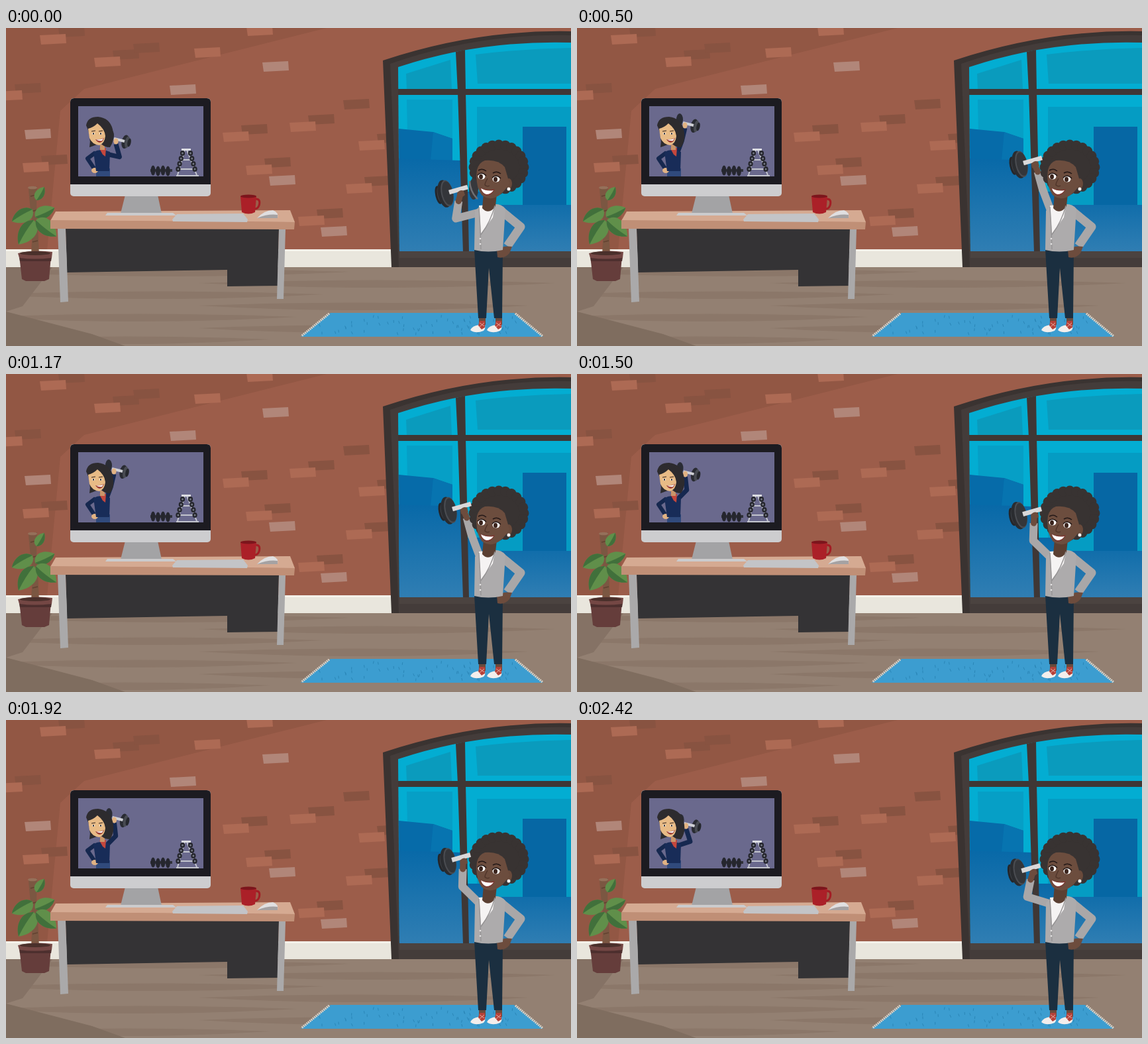
Write an HTML page that moves like this. It is 853 px wide and 480 px high and loops after 2.51 s.

```html
<!DOCTYPE html>
<html lang="en">
<head>
<meta charset="utf-8">
<title>Workout at home</title>
<style>
  html, body { margin: 0; width: 100%; height: 100%; overflow: hidden; background: #9b5c49; }
  svg { display: block; width: 100vw; height: 100vh; }
</style>
</head>
<body>
<svg id="stage" viewBox="0 0 853 480" preserveAspectRatio="none"></svg>
<script>
const poly = (points, fill) => `<polygon points="${points}" fill="${fill}"/>`;
const path = (d, fill) => `<path d="${d}" fill="${fill}"/>`;
const line = (d, color, width, extra = '') =>
  `<path d="${d}" fill="none" stroke="${color}" stroke-width="${width}" stroke-linejoin="round" ${extra}/>`;
const oval = (x, y, rx, ry, fill, extra = '') =>
  `<ellipse cx="${x}" cy="${y}" rx="${rx}" ry="${ry}" fill="${fill}" ${extra}/>`;
const rect = (x, y, w, h, fill, extra = '') =>
  `<rect x="${x}" y="${y}" width="${w}" height="${h}" fill="${fill}" ${extra}/>`;
const group = (transform, content, extra = '') => `<g transform="${transform}" ${extra}>${content}</g>`;
const fade = (id, top, bottom) => `<linearGradient id="${id}" x2="0" y2="1">
  <stop stop-color="${top}"/><stop offset="1" stop-color="${bottom}"/></linearGradient>`;
const repeat = (n, make) => Array.from({ length: n }, (_, i) => make(i)).join('');

let seed = 7;
const random = () => (seed = seed * 16807 % 2147483647) / 2147483647;

// Bricks: a light one usually has a darker neighbour up and to its right.
const brick = (x, y, fill) =>
  path(`M${x - 20} ${y - 6}L${x + 19} ${y - 8}L${x + 20} ${y + 6}L${x - 18} ${y + 8}Z`, fill);
const pair = (x, y) => brick(x + 28, y - 11, '#885341') + brick(x, y, '#ad6a54');
const pale = (x, y) => brick(x, y, '#b18679');

function wall() {
  return rect(0, 0, 853, 480, '#9c5d4a')
    + poly('0,0 484,0 118,92 82,125 62,336 0,336', '#925744')
    + pair(71, 17) + pair(153, 51) + pair(383, 4) + pair(5, 102) + pair(45, 210)
    + pair(347, 164) + pair(448, 149) + pair(382, 214) + pair(533, 242) + pair(552, 177) + pair(461, 291)
    + brick(304, 37, '#ad6a54') + brick(212, 30, '#885341') + brick(529, 115, '#885341')
    + pale(407, 58) + pale(267, 93) + pale(48, 160) + pale(417, 230) + pale(495, 307)
    + rect(0, 334, 582, 27, '#e9e6dd') + rect(0, 334, 582, 3, '#f4f1e9');
}

function floor() {
  const streak = i => {
    const x = (i % 2) * 330 - 40, y = 368 + i * 17, w = 560 - i * 20;
    return path(`M${x} ${y}Q${x + w / 2} ${y - 9} ${x + w} ${y}Q${x + w / 2} ${y + 14} ${x} ${y}Z`, '#8b7769');
  };
  return rect(0, 361, 853, 119, '#938072') + repeat(7, streak)
    + poly('0,361 70,361 25,420 0,428', '#857265')
    + poly('0,428 130,462 180,480 0,480', '#7f6d5f');
}

function windowView() {
  return path('M569 49Q710 2 853 5V361H582Z', '#3a3331')
    + path('M580 54Q712 8 853 11V361H593Z', '#443c3a')
    + path('M592 59Q715 18 853 22V338H594Z', '#03add2')
    + poly('604,69 671,48 673,92 605,92', '#0a9bbd')
    + path('M709 40Q780 31 853 30V84H712Z', '#0a9bbd')
    + poly('605,108 674,108 674,170 606,160', '#069fc6')
    + rect(711, 119, 142, 148, '#059cc3')
    + poly('593,152 645,157 674,167 674,338 594,338', '#066ba9')
    + poly('645,157 674,167 674,200 641,199', '#0774b0')
    + rect(780, 149, 66, 189, '#0667a4')
    + poly('593,197 687,200 692,338 594,338', 'url(#near)')
    + poly('694,247 722,247 722,267 853,267 853,338 697,338', 'url(#near)')
    + poly('679,36 693,33 694,96 699,338 690,338 682,96', '#3f3735')
    + rect(592, 92, 261, 9, '#3f3735')
    + rect(594, 337, 259, 10, '#4b4340');
}

function rug() {
  const tuft = () => {
    const y = 433 + random() * 28, x = 490 + (430 - y) * 1.1 + random() * (270 + (y - 430) * 2.2);
    return line(`M${x} ${y}l${random() * 3 - 1} 4`, '#2a86b7', 1);
  };
  return poly('490,430 767,430 811,466 445,466', '#3c9dd0') + repeat(60, tuft)
    + line('M488 431L446 465M769 431L810 465', '#d9d2c8', 3.5, 'stroke-dasharray="2 1"');
}

function plant() {
  const leaf = (x, y, angle, size) => group(`translate(${x} ${y}) rotate(${angle}) scale(${size})`,
    path('M0 0C3 -16 24 -15 36 0C25 12 7 13 0 0Z', '#608f4a')
    + path('M0 0C7 13 25 12 36 0Q18 2 0 0Z', '#41703b'));
  return path('M34 241L47 239Q45 275 48 300L50 343H38L40 300Q36 270 34 241Z', '#7b5742')
    + repeat(4, i => line(`M${37 + i} ${254 + i * 23}l8 -2`, '#624231', 1.5))
    + oval(40, 241, 7, 2.3, '#95705a')
    + leaf(46, 260, -60, .65) + leaf(40, 274, 150, 1) + leaf(44, 285, -25, .9)
    + leaf(42, 290, 122, 1.2) + leaf(45, 290, 38, 1.1)
    + poly('20,344 68,344 65,379 58,382 30,382 24,379', '#653d3b')
    + poly('20,346 69,346 68,352 21,352', '#4d2f2e')
    + path('M18 340Q43 334 70 338L69 347Q43 350 20 347Z', '#744744')
    + oval(44, 340, 23, 3, '#4a302b');
}

function desk() {
  return poly('90,303 412,303 410,389 334,390 334,365 92,369', '#343335')
    + poly('78,303 90,303 94,413 82,414', '#aaa9aa')
    + poly('412,303 422,303 419,409 409,409', '#aaa9aa')
    + poly('75,277 429,275 436,293 67,291', '#d5aa92')
    + poly('67,290 436,293 435,304 67,303', '#c08f76')
    + poly('180,252 229,252 235,280 173,280', '#a3a3a5')
    + poly('153,279 252,279 257,283 150,283', '#cbcbcd')
    + poly('258,281 358,280 365,289 364,293 252,292 251,289', '#c3c4c7');
}

function deskItems() {
  return line('M377 258Q385 258 382 268Q380 273 376 273', '#a31d24', 3)
    + path('M354 254H378L376 278Q366 283 356 278Z', '#ab2028')
    + oval(366, 254, 12, 2.6, '#7c151c')
    + path('M379 287Q390 275 403 275Q412 278 410 287Z', '#e0dfe0')
    + path('M379 287Q396 280 410 282V287Z', '#a5a2a3');
}

function rack() {
  const weights = i => [-1, 1].map(side => {
    const x = 272.5 + side * (6 + i * 2.2), y = 189 + i * 8;
    return oval(x, y, 3.6, 4, '#25262d') + oval(x, y, 1.4, 1.6, '#777b87');
  }).join('');
  return line('M270 184L259 222M273 184L288 222M262 213H285M266 199H280M257 223H291', '#c3c5ce', 2)
    + rect(265, 182, 14, 3, '#dcdde3') + repeat(4, weights)
    + rect(218, 213, 33, 4, '#30323a')
    + repeat(4, i => oval(222 + i * 7.5, 215 + i % 2, 3.4, 7.5, '#25262e'));
}

function coach() {
  return oval(-9, -9, 5, 9, '#2a2c34', 'id="coachDisc"')
    + line('', '#16284f', 7, 'id="coachArm"')
    + group('', group('rotate(12)', oval(13, -2, 5.5, 10.5, '#292b32')
      + oval(16, -2, 3.6, 9, '#484b52') + oval(19, -2, 2.6, 6.5, '#25272d'))
      + line('M-4 -4L12 0', '#cfd0d5', 4) + oval(-1, 0, 3.6, 4.6, '#e2b383'), 'id="coachBell"')
    + rect(136, 212, 21, 14, '#304a7c')
    + line('M135 188L123 197L133 212', '#16284f', 6)
    + oval(134, 215, 5, 4, '#e2b383')
    + path('M132 187Q144 181 157 187L156 216H136Z', '#182c58')
    + poly('141,182 151,181 150,194 146,191', '#c4473d')
    + rect(142, 176, 7, 8, '#c9966a')
    + coachHead();
}

function coachHead() {
  const eye = x => line(`M${x - 3} 156l6 -1`, '#33231f', 1) + oval(x, 159.5, 2, 1.4, '#fff') + oval(x, 159.5, 1, 1.4, '#201a1b');
  return path('M121 147Q123 134 139 134Q157 136 161 153Q165 169 157 180Q148 180 143 174L126 180Q129 163 121 147Z', '#2d2b2e')
    + path('M124 152Q132 150 138 144Q149 152 150 163Q149 174 141 177Q130 176 126 166Z', '#e8bb86')
    + eye(132) + eye(143)
    + path('M135 168Q141 169 148 166Q146 173 141 173Q137 172 135 168Z', '#9c3d35')
    + path('M136 168.5Q141 169 147 167L145 170Q140 171 136 168.5Z', '#fff');
}

function monitor() {
  return rect(97, 106, 212, 148, '#cdcdcf', 'rx="5"')
    + path('M97 236V112Q97 106 103 106H303Q309 106 309 112V236Z', '#1c1b21')
    + rect(109, 118, 189, 106, '#6a698d')
    + `<g clip-path="url(#screen)">${rack()}${coach()}</g>`;
}

function hair() {
  const curl = i => {
    const a = i * Math.PI / 12;
    return oval(744 + 38 * Math.cos(a), 210 + 34 * Math.sin(a), 7.5, 7.5, '#383332');
  };
  return oval(744, 210, 41, 37, '#383332') + repeat(24, curl);
}

function legs() {
  const leg = x => rect(x, 434, 10, 14, '#6a4a3b') + group(`translate(${x - 1} 453)`,
    path('M-12 3Q-9 -4 2 -5L9 -6Q12 0 8 4Q-4 9 -12 3Z', '#f3eeec')
    + path('M0 -4L2 -11H10V-1L5 2Z', '#b54138')
    + line('M2 -8l7 5m0 -5l-7 6', '#e5a89f', 1));
  return leg(714) + leg(739)
    + poly('707,334 750,334 749,438 737,438 729,362 725,438 713,438', '#1b2f40');
}

function body() {
  return line('M745 274L777 300L757 329', '#a9a7a8', 13)
    + path('M741 334Q751 328 764 330L760 340Q752 349 742 346Z', '#6d4c3d')
    + path('M708 276Q718 265 730 267Q746 263 754 273L750 335Q728 340 707 335Z', '#adabac')
    + path('M714 268L738 266L735 286L717 310Z', '#f5f3f3')
    + path('M721 250H741L739 269Q729 283 719 272Z', '#5a3f32')
    + line('M714 270Q716 295 717 334M738 268Q732 292 717 312', '#949293', 1.3)
    + repeat(2, i => oval(716, 318 + i * 8, 1.3, 1.3, '#e6e4e4'));
}

function face() {
  const eye = (x, y) => oval(x, y, 5.5, 4.5, '#fff') + oval(x - 1, y + .5, 3, 3.8, '#3b241d')
    + line(`M${x - 6} ${y - 2}Q${x} ${y - 8} ${x + 7} ${y - 1}m-12 -8q6 -4 12 1`, '#231817', 1.6);
  return oval(759, 235, 5, 8, '#694a3b')
    + path('M711 214Q714 203 723 200Q743 198 753 210L760 234Q751 251 738 256Q727 260 718 252Q708 238 711 214Z', '#6c4d3e')
    + eye(718, 224) + eye(740, 228)
    + line('M727 227Q723 234 723 237Q726 240 730 238', '#4e3429', 1.3)
    + path('M716 241Q726 246 738 243Q734 253 725 253Q718 250 716 241Z', '#7d3932')
    + path('M717 242Q726 247 736 245Q732 251 725 251Q719 249 717 242Z', '#fff')
    + oval(759, 243, 2.5, 2.6, '#f7f3f2');
}

function bell() {
  const discs = oval(-33, 6, 5, 14, '#24262a') + oval(-31, 6, 4, 12, '#414449')
    + oval(-24, 6, 10, 21, '#2a2c30') + oval(-20, 6, 9, 20, '#4a4c51') + oval(-19, 6, 8, 18, '#34363a');
  return group('rotate(-12 -23 6)', discs)
    + line('M-17 4L11 -4', '#d9d8d9', 7)
    + path('M-5 5Q0 -1 5 2L7 8Q2 13 -4 11Z', '#6d4c3d');
}

function athlete() {
  return legs()
    + line('', '#a9a7a8', 12, 'id="arm"')
    + line('', '#6d4c3d', 9, 'id="wrist" stroke-linecap="round"')
    + body() + hair()
    + group('', oval(20, -1, 7, 16, '#37383c') + line('M14 -13Q15 4 26 14', '#6f7074', 2.5), 'id="farDisc"')
    + face()
    + group('', bell(), 'id="bell"');
}

const stage = document.getElementById('stage');
stage.innerHTML = `<defs>${fade('near', '#0869a8', '#307eb3')}
  <clipPath id="screen">${rect(109, 118, 189, 106, '#000')}</clipPath></defs>`
  + wall() + floor() + windowView() + plant() + desk() + deskItems() + monitor() + rug() + athlete();

const LOOP = 2510, FRAMES = 30, STEP = 250 / 3, CYCLE = 10.5;
const set = (id, name, value) => document.getElementById(id).setAttribute(name, value);
const mix = (a, b, k) => a + (b - a) * k;

function ease(from, to, t) {
  const k = Math.min(1, Math.max(0, (t - from) / (to - from)));
  return k * k * (3 - 2 * k);
}

// Push up quickly, hold, lower again.
const lift = phase => ease(.3, 2.6, phase) - ease(7, 8.9, phase);

// Elbow of a two-part arm; side picks the way it bends.
function elbow(sx, sy, hx, hy, upper, lower, side) {
  const dx = hx - sx, dy = hy - sy, d = Math.hypot(dx, dy);
  const along = (upper * upper - lower * lower + d * d) / (2 * d);
  const out = side * Math.sqrt(Math.max(0, upper * upper - along * along));
  return [sx + (dx * along - dy * out) / d, sy + (dy * along + dx * out) / d];
}

function draw(ms) {
  // The motion advances in twelfths of a second.
  const step = Math.min(FRAMES - 1, Math.floor((ms % LOOP + 3.5) / STEP));
  const h = lift(step % CYCLE);

  const x = mix(686, 691, h), y = mix(244, 200, h), at = `translate(${x} ${y})`;
  const [ex, ey] = elbow(716, 278, x, y, 38, 44, -1);
  const cuff = `${mix(x, ex, .4)} ${mix(y, ey, .4)}`;
  set('arm', 'd', `M716 278L${ex} ${ey}L${cuff}`);
  set('wrist', 'd', `M${cuff}L${x} ${y + 6}`);
  set('bell', 'transform', at);
  set('farDisc', 'transform', at);
  set('farDisc', 'opacity', Math.max(0, 1 - 3 * h));

  const cx = mix(167, 164, h), cy = mix(171, 147, h), coachAt = `translate(${cx} ${cy})`;
  const bend = elbow(151, 190, cx, cy, 21, 24, 1);
  set('coachArm', 'd', `M151 190L${bend}L${cx - 1} ${cy + 4}`);
  set('coachBell', 'transform', coachAt);
  set('coachDisc', 'transform', coachAt);
}

function tick(now) {
  draw(now);
  requestAnimationFrame(tick);
}
draw(0);
requestAnimationFrame(tick);
</script>
</body>
</html>
```
